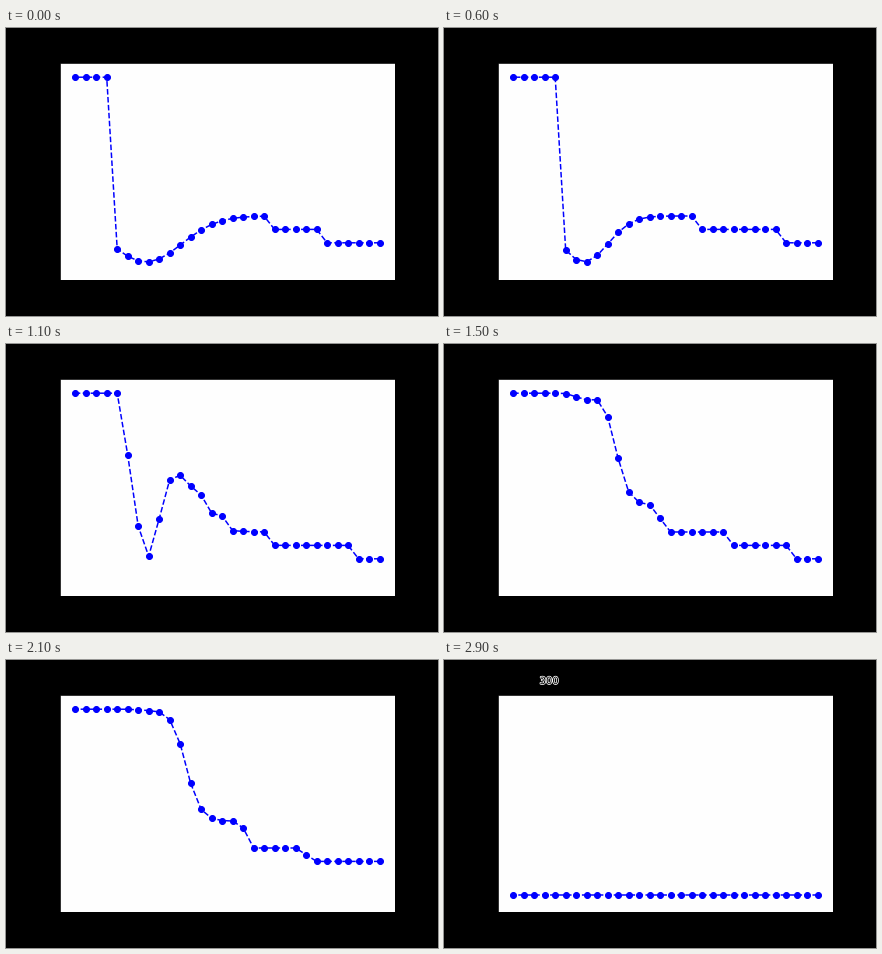
Write a matplotlib script that moves like this. It is 432 px wide and 288 px high and loops after 3 s.

```python
import matplotlib.pyplot as plt
import matplotlib.patheffects as pe
import numpy as np
from matplotlib.animation import FuncAnimation

W, H, DPI = 432, 288, 72
FRAMES, STEP_MS = 30, 100
LEFT, RIGHT, TOP, BOTTOM = 54, 388.8, 34.56, 252
HIGH, SHELF, RISER, FLOOR = 49.2, 161.2, 13.4, 235.2
DIP_AT = 6.75
COLLAPSE = 22          # step at which the curve drops to the floor
FAR_BELOW = 4000

i = np.arange(30)
x = 69.218 + 10.495 * i

# Shape parameters at a few key steps
KEY_STEPS = [0, 6, 11, 15, 22]
KEYS = {
    "start": [4, 5, 5, 5, 5],                # first point off the plateau
    "front": [0, 0, 9, 9.8, 10.67],          # centre of the falling front
    "width": [0.6, 0.6, 1.3, 0.6, 0.69],     # softness of the front
    "dip": [46, 46, 146, 6, 0],              # depth of the trough
    "spread": [4.8, 3.2, 1.8, 1, 1],         # width of the trough
    "stair1": [3, 3, 13, 14, 17.5],          # where the tail steps down
    "stair2": [4, 4, 15, 15, 16.75],
    "stair3": [19, 18, 19, 21, 22.75],
    "stair4": [24, 26, 27, 27, 32.25],
}


def ramp(edge):
    """Rise from 0 to 1 over the one point before the edge."""
    return np.clip(i - edge + 1, 0, 1)


def falling_curve(step):
    p = {name: np.interp(step, KEY_STEPS, v) for name, v in KEYS.items()}
    tail = SHELF + RISER * sum(ramp(p[f"stair{k}"]) for k in range(1, 5))
    front = 1 / (1 + np.exp((p["front"] - i) / p["width"]))
    dip = p["dip"] * np.exp(-((i - DIP_AT) / p["spread"]) ** 2)
    drop = (tail - HIGH) * front + dip
    return np.minimum(HIGH + drop * ramp(p["start"]), FLOOR)


def floor_curve(step):
    # one point at a time shoots far below the axes, moving right
    spike = 5 * (step - COLLAPSE) + 1
    return np.where(i == spike, FAR_BELOW, FLOOR)


fig = plt.figure(figsize=(W / DPI, H / DPI), dpi=DPI, facecolor="black")
ax = fig.add_axes([LEFT / W, 1 - BOTTOM / H, (RIGHT - LEFT) / W,
                   (BOTTOM - TOP) / H], facecolor="#fefefe")
ax.set(xlim=(LEFT, RIGHT), ylim=(BOTTOM, TOP), xticks=[], yticks=[])

line, = ax.plot([], [], "o--", color="#0000ff", lw=1.5, ms=6)
label = fig.text(105 / W, 1 - 20 / H, "300", color="black", fontsize=10,
                 family="DejaVu Sans", ha="center", va="center_baseline",
                 path_effects=[pe.withStroke(linewidth=1.5,
                                             foreground="white")])


def draw(step):
    y = falling_curve(step) if step < COLLAPSE else floor_curve(step)
    # drawn from right to left, so the dashes on the left slide
    line.set_data(x[::-1], y[::-1])
    label.set_visible(step == FRAMES - 1)
    return line, label


anim = FuncAnimation(fig, draw, frames=FRAMES, interval=STEP_MS,
                     repeat=True, repeat_delay=0)
plt.show()
```
